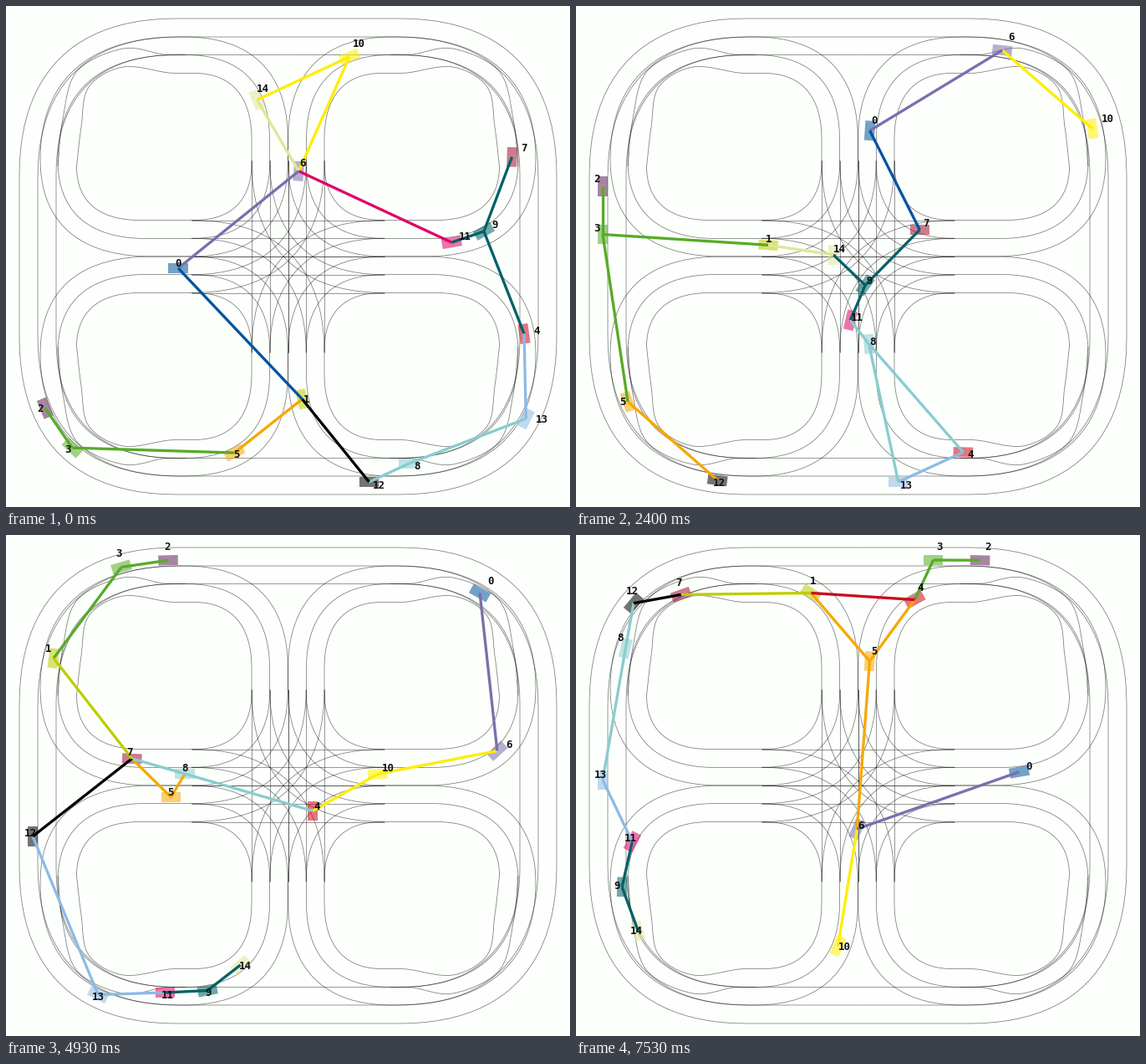
A matplotlib script that plays this animation: 675 px wide and 600 px high, repeating every 7600 ms.

```python
import numpy as np
import matplotlib.pyplot as plt
from matplotlib.animation import FuncAnimation
from matplotlib.collections import LineCollection, PolyCollection
from matplotlib.colors import to_rgba

W, H, DPI = 675, 600, 100
LOOP_MS, TICK, STEPS = 7600, 20, 114
PX = 72 / DPI
CAR_LEN, CAR_WID = 23.5, 12
REACH, AHEAD = 216, 8  # coupling range in px, look-ahead in steps


def rounded(*pts):
    """Line through (x, y) and eased corners (x, y, r); closed if all are corners."""
    t = np.linspace(0, 1, 24)[:, None]
    v = [np.array(p[:2], float) for p in pts]
    r = [1.144 * p[2] if len(p) > 2 else 0 for p in pts]
    parts = []
    for i, c in enumerate(v):
        if not r[i]:
            parts.append(c[None])
            continue
        ends = []
        for j in (i - 1, (i + 1) % len(v)):
            leg = np.hypot(*(v[j] - c))
            reach = min(r[i], leg * r[i] / (r[i] + r[j]))
            ends.append(c + (v[j] - c) / leg * reach)
        a, b = ends
        p, q = a + (c - a) * 0.65, b + (c - b) * 0.65
        parts.append((1 - t) ** 3 * a + 3 * t * (1 - t) ** 2 * p
                     + 3 * t * t * (1 - t) * q + t ** 3 * b)
    if r[0]:
        parts.append(parts[0][:1])
    return np.vstack(parts)


def smooth(*pts):
    """Catmull-Rom curve through the points."""
    p = np.array(pts, float)
    p = np.vstack([2 * p[0] - p[1], p, 2 * p[-1] - p[-2]])
    t = np.linspace(0, 1, 10)[:, None]
    return np.vstack([
        0.5 * (2 * b + (c - a) * t + (2 * a - 5 * b + 4 * c - d) * t ** 2
               + (3 * b - a - 3 * c + d) * t ** 3)
        for a, b, c, d in zip(p, p[1:], p[2:], p[3:])])


def track():
    """Lane borders of the upper left quarter, mirrored to all four."""
    quarter = [
        # ring
        rounded((16, 300), (16, 15, 164), (337.5, 15)),
        rounded((38, 300), (38, 37, 147), (337.5, 37)),
        rounded((60, 300), (60, 58.5, 125), (337.5, 58.5)),
        # loops into the arms
        rounded((337.5, 185), (337.5, 37, 108), (41, 37, 146), (41, 300, 116), (222, 300)),
        rounded((315.5, 185), (315.5, 58.5, 88), (62, 58.5, 125), (62, 278.5, 92), (222, 278.5)),
        rounded((294, 185), (294, 80.5, 69), (225, 80.5)),
        rounded((84.5, 192), (84.5, 256.5, 66), (222, 256.5)),
        # bulges where the inner lane merges
        smooth((215, 58.5), (188, 58), (140, 51), (85, 78), (68, 135), (62, 192)),
        smooth((225, 80.5), (195, 80), (140, 73), (99, 97), (90, 145), (84.5, 192)),
    ]
    # crossing: right turn, left turn and straight on for each border
    for k in range(3):
        x, y = 294 + 21.75 * k, 256.5 + 21.75 * k
        if k < 2:
            quarter.append(rounded((222, y), (x, y, 60 + 20 * k), (x, 185)))
        quarter.append(rounded((222, y), (W - x, y, 146 - 21 * k), (W - x, 415)))
        quarter += [np.array([(x, 185), (x, 300)]), np.array([(222, y), (337.5, y)])]
    return [c * (sx, sy) + (W * (sx < 0), H * (sy < 0))
            for c in quarter for sx in (1, -1) for sy in (1, -1)]


class Car:
    """Runs along a closed route, passing its stops at equal intervals."""

    def __init__(self, num, color, route, *stops):
        self.num, self.color = num, color
        d = np.r_[0, np.cumsum(np.hypot(*np.diff(route, axis=0).T))]
        self.lap = d[-1]
        self.s = np.arange(0, self.lap)
        self.path = np.column_stack([np.interp(self.s, d, route[:, k]) for k in (0, 1)])
        at = np.array([self.s[np.argmin(np.hypot(*(self.path - p).T))] for p in stops])
        self.dist = np.cumsum(np.r_[at[0], np.diff(at) % self.lap])
        self.times = np.linspace(0, STEPS - 1, len(stops))

    def point(self, s):
        return np.array([np.interp(s, self.s, self.path[:, k], period=self.lap)
                         for k in (0, 1)])

    def pose(self, step):
        s = np.interp(step, self.times, self.dist)
        dx, dy = self.point(s + 2) - self.point(s - 2)
        return self.point(s), np.arctan2(dy, dx)


def body(pos, angle):
    c, s = np.cos(angle), np.sin(angle)
    box = np.array([(-1, -1), (1, -1), (1, 1), (-1, 1)]) * (CAR_LEN / 2, CAR_WID / 2)
    return box @ np.array([(c, s), (-s, c)]) + pos


def sq_dist(p):
    return ((p[:, None] - p[None]) ** 2).sum(axis=2)


def coupled(now, later):
    """Pairs that stay in reach and have no third car between them."""
    d = sq_dist(now)
    near = np.maximum(d, sq_dist(later)) < REACH ** 2
    free = (d[:, None, :] + d[None, :, :] >= d[:, :, None] - 1e-6).all(axis=2)
    return np.argwhere(np.triu(near & free, 1))


half = [(351, 52, 98), (620, 52, 115), (620, 286, 105), (324, 286, 116)]
eight = half + [(W - x, H - y, r) for x, y, r in half]
RING = rounded((643, 570, 150), (32, 570, 150), (32, 30, 150), (643, 30, 150))
EIGHT = rounded(*eight)
MIRROR = rounded(*[(W - x, y, r) for x, y, r in eight[::-1]])
CLOVER = rounded((614, 538, 95), (367, 532, 76), (367, 68, 76), (609, 62, 95),
                 (603, 268, 75), (72, 268, 75), (66, 62, 95), (308, 68, 76),
                 (308, 532, 76), (66, 538, 95), (72, 332, 75), (626, 332, 75))

# by priority: a link takes the colour of the car listed first
cars = [
    Car(3, "#57ab27", RING, (80, 529), (428, 29)),
    Car(10, "#ffed00", EIGHT, (410, 58), (312, 491)),
    Car(9, "#006165", EIGHT, (571, 269), (54, 421)),
    Car(5, "#f6a800", EIGHT, (275, 539), (350, 151)),
    Car(8, "#89cccf", MIRROR, (482, 550), (350, 394), (207, 286), (62, 136)),
    Car(14, "#e0e69a", CLOVER, (301, 112), (307, 307), (275, 520), (66, 477)),
    Car(13, "#8ebae5", RING, (621, 494), (32, 293)),
    Car(11, "#e30066", EIGHT, (533, 282), (64, 366)),
    Car(4, "#cc071e", CLOVER, (626, 392), (367, 450), (405, 77)),
    Car(12, "#000000", RING, (435, 571), (70, 83)),
    Car(6, "#7a6fac", EIGHT, (349, 198), (336, 352)),
    Car(0, "#00549f", EIGHT, (206, 315), (531, 284)),
    Car(1, "#bdcd00", MIRROR, (355, 471), (284, 65)),
    Car(2, "#612158", RING, (48, 481), (484, 32)),
    Car(7, "#a11035", CLOVER, (604, 181), (122, 63)),
]

fig = plt.figure(figsize=(W / DPI, H / DPI), dpi=DPI, facecolor="#fdfffd")
ax = fig.add_axes([0, 0, 1, 1])
ax.set(xlim=(0, W), ylim=(H, 0))
ax.axis("off")

ax.add_collection(LineCollection(track(), colors=[(0, 0, 0, 0.5)], linewidths=0.8 * PX,
                                 zorder=1), autolim=False)
bodies = PolyCollection([body((0, 0), 0)], facecolors=[to_rgba(c.color, 0.55) for c in cars],
                        edgecolors="none", zorder=2)
links = LineCollection([], linewidths=3.3 * PX, zorder=3)
ax.add_collection(bodies, autolim=False)
ax.add_collection(links, autolim=False)
labels = [ax.text(0, 0, str(c.num), family="DejaVu Sans Mono", weight="bold",
                  size=12.5 * PX, color="#111111", zorder=4) for c in cars]


def draw(frame):
    # poses change only at whole steps, rounded to the nearest tick
    step = int((frame * TICK + 14) * STEPS / LOOP_MS)
    poses = [c.pose(step) for c in cars]
    now = np.array([p for p, _ in poses])
    later = np.array([c.pose(step + AHEAD)[0] for c in cars])
    pairs = coupled(now, later)
    bodies.set_verts([body(*p) for p in poses])
    links.set_segments([now[pair] for pair in pairs])
    links.set_color([cars[a].color for a, _ in pairs])
    for label, (x, y) in zip(labels, now):
        label.set_position((1.037 * x - 11.75, 1.037 * y - 13.5))
    return [bodies, links, *labels]


anim = FuncAnimation(fig, draw, frames=LOOP_MS // TICK, interval=TICK, repeat=True,
                     repeat_delay=0, blit=False)
plt.show()
```
